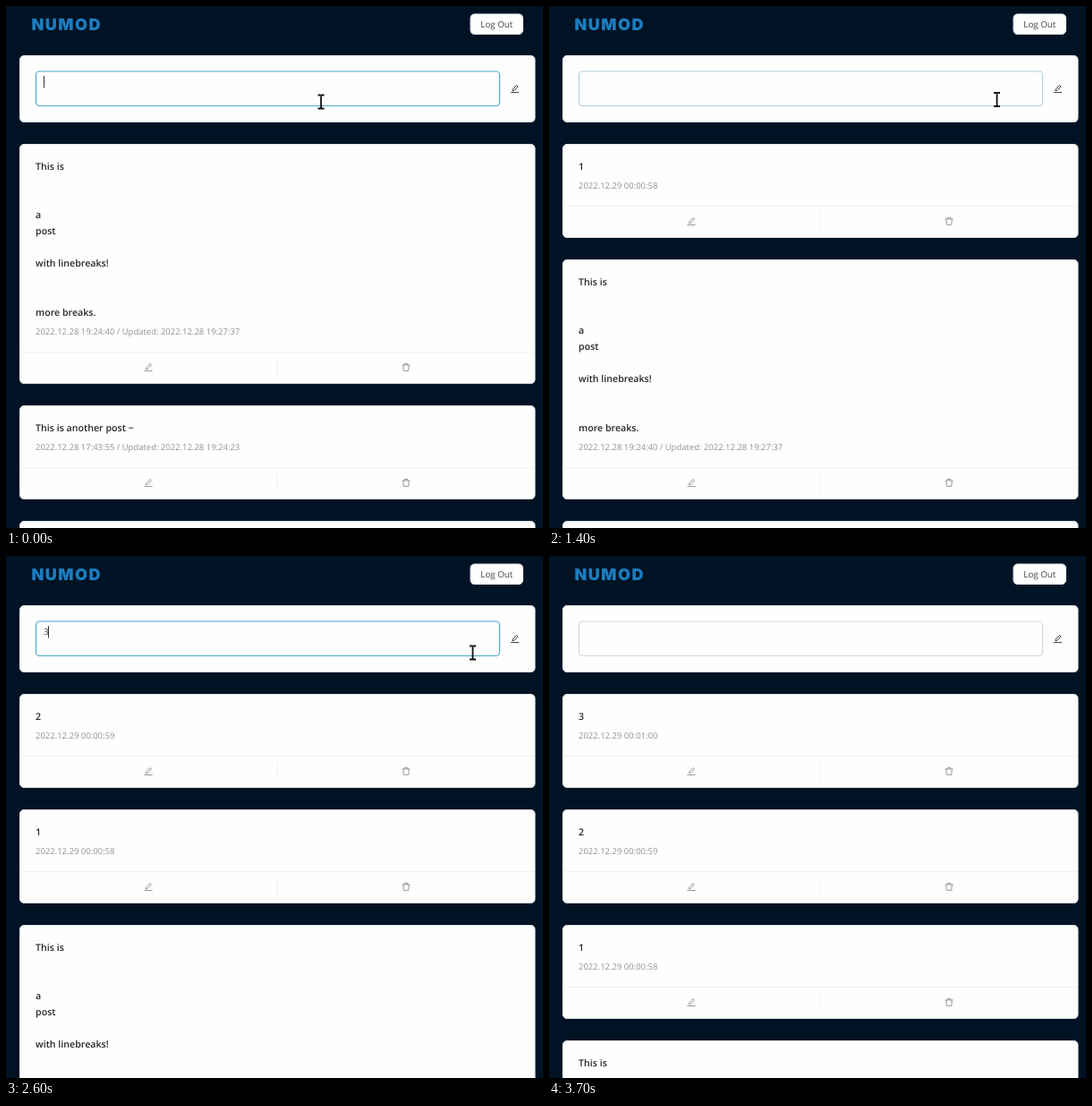
These frames come from a looping animation (600x583 px, 4100 ms). An HTML page:

```html
<!DOCTYPE html>
<html lang="en">
<head>
<meta charset="utf-8">
<style>
html, body { margin: 0; width: 100%; height: 100%; overflow: hidden; background: #001325; }
svg { display: block; width: 600px; height: 583px; font-family: "Open Sans", "Noto Sans", sans-serif; text-rendering: geometricPrecision; }
text { white-space: pre; }
.brand { font: 900 18px Inter, sans-serif; letter-spacing: 1.5px; fill: #1b7dc0; }
.body { font-size: 10.65px; font-weight: 600; fill: #262626; }
.date { font-size: 9.48px; fill: #929292; }
.field { font-size: 9.8px; fill: #444; }
.rule { stroke: #f0f0f0; }
.icon { fill: none; stroke-width: .9; }
</style>
</head>
<body>
<svg id="stage" viewBox="0 0 600 583"></svg>
<script>
const LOOP = 4100, STEP = 100;
const stage = document.getElementById('stage');

const oldPosts = [
  { lines: ['This is', '', '', 'a', 'post', '', 'with linebreaks!', '', '', 'more breaks.'],
    date: '2022.12.28 19:24:40 / Updated: 2022.12.28 19:27:37' },
  { lines: ['This is another post ~'],
    date: '2022.12.28 17:43:55 / Updated: 2022.12.28 19:24:23' },
  { lines: [''], date: '' }
];

// Each round: focus the field, type a digit, send it, see it listed.
const rounds = [
  { focus: 0, type: 500, press: 1100, send: 1200, list: 1300, date: '2022.12.29 00:00:58' },
  { focus: 1500, type: 1700, press: 2100, send: 2200, list: 2300, date: '2022.12.29 00:00:59' },
  { focus: 2400, type: 2600, press: 3100, send: 3200, list: 3300, date: '2022.12.29 00:01:00' }
].map((r, i) => ({ ...r, digit: String(i + 1) }));

// Pointer path: time, x, y
const path = [
  [0, 352, 107], [300, 358, 107], [500, 400, 106], [900, 553, 102], [1100, 574, 98],
  [1200, 570, 99], [1400, 500.5, 104.5], [1700, 492, 105], [2000, 576, 98], [2200, 576, 98],
  [2400, 548, 105], [2600, 521.5, 108], [2800, 521.5, 108], [3100, 573, 100],
  [3300, 573, 100], [3500, 580, 37], [3600, 600, 10]
];

const lerp = (a, b, k) => a + (b - a) * k;
const box = (x, y, w, h, r, more) =>
  `<rect x="${x}" y="${y}" width="${w}" height="${h}" rx="${r}" ${more}/>`;
const panel = (x, y, w, h) => box(x + .5, y + .5, w - 1, h - 1, 4.5, 'fill="#fefefe" stroke="#dfe8ec"');
const text = (cls, x, y, s) => `<text class="${cls}" x="${x}" y="${y}">${s}</text>`;
const shape = (x, y, d, more) => `<path transform="translate(${x} ${y})" d="${d}" ${more}/>`;

const PEN = 'M-4.6 4.1H4.6M-2.6 2.3L-2.2 .4L1.9 -3.9L3.5 -2.4L-.9 2Z';
const BIN = 'M-4.4 -2.5H4.4M-3.2 -2.5L-2.8 3.9H2.8L3.2 -2.5M-1.6 -2.5V-4.1H1.6V-2.5';
const icon = (x, y, d, color) => shape(x, y, d, `class="icon" stroke="${color}"`);

function card(post, y) {
  const h = 105 + (post.lines.length - 1) * 18.12, end = y + h;
  const svg = panel(15, y, 576.5, h) +
    post.lines.map((s, i) => text('body', 33, y + 28.5 + i * 18.12, s)).join('') +
    text('date', 33, end - 54.8, post.date) +
    `<path class="rule" d="M16 ${end - 35.5}H590M303 ${end - 28}v19"/>` +
    icon(159, end - 18.6, PEN, '#8c8c8c') + icon(447, end - 18.6, BIN, '#8c8c8c');
  return { svg, next: end + 24 };
}

function pointer(t) {
  if (t >= 3600) return '';
  const i = path.findIndex(p => p[0] > t);
  const [a, b] = [path[i - 1], path[i]];
  const k = (t - a[0]) / (b[0] - a[0]);
  const x = lerp(a[1], b[1], k), y = lerp(a[2], b[2], k);
  const outline = 'fill="#fff" stroke="#222" stroke-linejoin="round"';
  if (x < 552 && y > 73)
    return shape(x, y, 'M-3.5 -7.5H-1L0 -7L1 -7.5H3.5M0 -7V7M-3.5 7.5H-1L0 7L1 7.5H3.5',
      'fill="none" stroke="#111" stroke-width="1.8"');
  if (x < 562 || y < 80)
    return shape(x, y, 'M0 0V17L4 13.5L7 20.5L10 19.3L7 12.5H12Z', outline);
  return shape(x, y, 'M-1.5 9V1a1.5 1.5 0 0 1 3 0V5.5q1.3-.8 2.2 .4q1.3-.7 2.2 .5q1.6-.4 1.9 1.2V11.5L6.3 14V16H-.5V14.5L-4.5 9.5Q-4.5 7.3-1.5 9Z', outline);
}

function field(t) {
  const r = rounds.filter(r => t >= r.focus).pop();
  const typed = t >= r.type && t < r.send;
  const gone = t < r.send ? 0 : 1 - .65 * .62 ** ((t - r.send) / STEP);
  const color = [[74, 217], [170, 218], [205, 226]].map(([on, off]) => Math.round(lerp(on, off, gone)));
  const since = t - (t < r.type ? r.focus : r.type);
  const caret = t < r.press && since % 1060 < 530;
  const x = typed ? 47.5 : 42.5;
  return box(33.5, 73, 518, 38.5, 4, `fill="#fefefe" stroke="rgb(${color})" stroke-width="1.2"`) +
    (typed ? text('field', 42, 88.3, r.digit) : '') +
    (caret ? `<path d="M${x} 78V91.5" stroke="#333"/>` : '');
}

function scene(t) {
  let svg = text('brand', 28.5, 26.5, 'NUMOD') +
    panel(518.5, 8.5, 59.5, 23.5) + text('field', 530.3, 24, 'Log Out') +
    panel(15, 55, 576.5, 75) + field(t) + icon(568.5, 92.5, PEN, '#262626');
  const fresh = rounds.filter(r => t >= r.list).reverse().map(r => ({ lines: [r.digit], date: r.date }));
  let y = 154;
  for (const post of [...fresh, ...oldPosts]) {
    if (y > 583) break;
    const c = card(post, y);
    svg += c.svg;
    y = c.next;
  }
  return svg + pointer(t);
}

let start, shown;
function tick(now) {
  start ??= now;
  const t = Math.floor((now - start) % LOOP / STEP) * STEP;
  if (t !== shown) stage.innerHTML = scene(shown = t);
  requestAnimationFrame(tick);
}
stage.innerHTML = scene(0);
requestAnimationFrame(tick);
</script>
</body>
</html>
```
